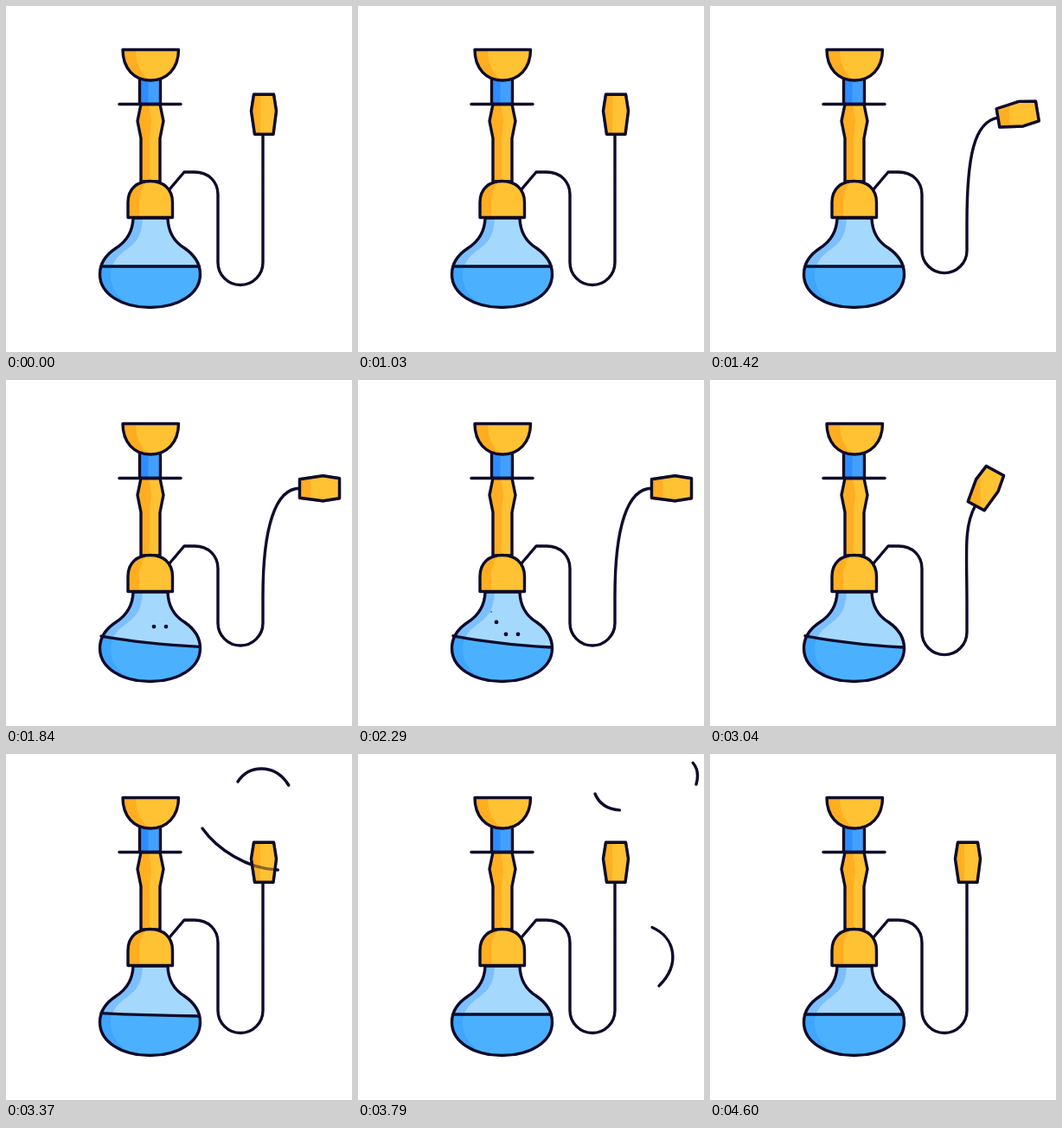
Recreate the animation shown at these times as an HTML page. Size 400 px wide and 400 px high, loop 4630 ms.

```html
<!DOCTYPE html>
<html lang="en">
<head>
<meta charset="utf-8">
<title>Hookah</title>
<style>
html, body { margin: 0; width: 100%; height: 100%; overflow: hidden; background: #fff; }
svg { display: block; width: 100vw; height: 100vh; }
.line { fill: none; stroke: #0f0b2b; stroke-width: 3.4; stroke-linecap: round; stroke-linejoin: round; }
.gold { fill: #ffc233; }
.amber { fill: #ffae22; }
</style>
</head>
<body>
<svg viewBox="0 0 400 400">
  <defs>
    <path id="bowl" d="M135 50.5H199.5C199.5 72 186 86 167 86S135 72 135 50.5Z"/>
    <path id="stem" d="M156 113.5L152 133L156 153V203H178V153L182 133L178 113.5Z"/>
    <path id="cap" d="M141 244.5V227C141 211 152 202.5 166.7 202.5S192.5 211 192.5 227V244.5Z"/>
    <path id="vase" d="M147 245C146.500 262 138 273 127 280C115 288 108.500 297 108.500 310C108.500 333 134 348.500 166.500 348.500S224.500 333 224.500 310C224.500 297 218 288 206.500 280C195 273 187.500 262 187 245Z"/>
    <path id="tip" d="M-11.500 -23H11.500L14.500 -4L11 23H-10.500L-14.500 -4Z"/>
    <clipPath id="bowlClip"><use href="#bowl"/></clipPath>
    <clipPath id="capClip"><use href="#cap"/></clipPath>
    <clipPath id="vaseClip"><use href="#vase"/></clipPath>
    <clipPath id="tipClip"><use href="#tip" class="turn"/></clipPath>
    <g id="mouthpiece">
      <g clip-path="url(#tipClip)">
        <rect class="gold" x="-40" y="-40" width="80" height="80"/>
        <rect class="amber" id="tipShade" x="-40" y="-40" width="36" height="80"/>
      </g>
      <use href="#tip" class="line turn"/>
    </g>
  </defs>

  <path id="hose" class="line"/>

  <g clip-path="url(#vaseClip)">
    <rect x="100" y="240" width="130" height="112" fill="#a5d8fd"/>
    <path id="water" fill="#4bb1ff"/>
    <path d="M158 244C157 265 152 272 140 281C127 290 121 299 121 312C121 330 137 345 157 350H100V244Z" fill="#2a8cff" opacity=".33"/>
  </g>
  <path id="level" class="line"/>
  <g id="bubbles" fill="#0f0b2b"></g>
  <use href="#vase" class="line"/>

  <rect x="154.500" y="83" width="24" height="30.500" fill="#42a0ff"/>
  <rect x="154.500" y="83" width="10" height="30.500" fill="#2f8cff"/>
  <path class="line" d="M154.500 83V113.500M178.500 83V113.500"/>

  <use href="#stem" class="gold"/>
  <path class="amber" d="M156 113.500L152 133L156 153V203H166V153L168 133L165 113.500Z"/>
  <use href="#stem" class="line"/>
  <path class="line" d="M131 113.500H202"/>

  <use href="#cap" class="gold"/>
  <path class="amber" clip-path="url(#capClip)" d="M140 246V200H168C158 205 154 215 154 228V246Z"/>
  <use href="#cap" class="line"/>

  <use href="#bowl" class="gold"/>
  <path class="amber" clip-path="url(#bowlClip)" d="M134 49H150C150 68 157 81 169 87H134Z"/>
  <use href="#bowl" class="line"/>

  <use href="#mouthpiece" class="move"/>
  <g id="smoke"></g>
  <use href="#mouthpiece" class="move" opacity=".5"/>
</svg>
<script>
const LOOP = 4630;
const $ = id => document.getElementById(id);
const all = sel => [...document.querySelectorAll(sel)];
const clamp = v => Math.max(0, Math.min(1, v));
const mix = (a, b, k) => a + (b - a) * k;
const ease = (t, start, dur) => {
  const u = clamp((t - start) / dur);
  return u * u * (3 - 2 * u);
};
const make = (tag, parent, attrs) => {
  const el = document.createElementNS("http://www.w3.org/2000/svg", tag);
  for (const k in attrs) el.setAttribute(k, attrs[k]);
  return parent.appendChild(el);
};

const movers = all(".move"), turners = all(".turn");

// head and tail: [start, duration]
const wisps = [
  { d: "M227 86C244 110 280 134 316 134C352 136 305 186 339 200C366 211 374 242 348 268",
    head: [3190, 430], tail: [3380, 650] },
  { d: "M268 32C281 12 309 12 324 32C338 54 352 50 358 30C364 6 380 2 387 10C394 18 393 28 391 35",
    head: [3190, 430], tail: [3380, 540] },
  { d: "M274 46C279 58 290 65 306 65C340 66 345 20 362 20C372 20 375 32 370 42",
    head: [3650, 430], tail: [3840, 560] }
].map(w => {
  const el = make("path", $("smoke"), { d: w.d, class: "line" });
  return { ...w, el, len: el.getTotalLength() };
});

// bubbles repeat every PERIOD while the pipe is drawn on
const PERIOD = 560, RISE = 0.08, BLOW = [1540, 2760];
const bubbles = [
  { x: 149, y: 301, born: 2532, life: 250 },
  { x: 154, y: 302, born: 1865, life: 445 },
  { x: 160, y: 303, born: 2003, life: 430 },
  { x: 171, y: 300, born: 2215, life: 300 },
  { x: 185, y: 306, born: 2140, life: 320 }
].map(b => ({ ...b, el: make("circle", $("bubbles"), { cx: b.x }) }));

function drawPipe(t) {
  const p = ease(t, 1030, 490) - ease(t, 2735, 490);
  const cx = mix(298, 362.5, p), cy = 125.3;
  const a = p * Math.PI / 2, s = Math.sin(a), c = Math.cos(a);
  movers.forEach(m => m.setAttribute("transform", `translate(${cx} ${cy})`));
  turners.forEach(m => m.setAttribute("transform", `rotate(${p * 90})`));
  $("tipShade").setAttribute("width", mix(36, 30, p));

  const ex = cx - 23 * s - c, ey = cy + 23 * c;
  const low = mix(296.5, 281, p);
  $("hose").setAttribute("d",
    `M189 212L206 192H218C234 192 245 203 245 218V${low}` +
    `A26 26 0 0 0 297 ${low}V${mix(260, 250, p)}` +
    `C297 ${mix(210, 170, p)} ${ex - 28 * s} ${ey + 28 * c} ${ex} ${ey}`);
}

function drawWater(t) {
  const k = ease(t, 1540, 360) - ease(t, 3050, 480);
  const l = 301 - 5.2 * k, r = 301 + 8 * k;
  const top = `M110 ${l}Q160 ${(l + r) / 2 + 3 * k} 223.500 ${r}`;
  $("level").setAttribute("d", top);
  $("water").setAttribute("d", top + `H230V352H100V${l}Z`);
}

function drawBubbles(t) {
  for (const b of bubbles) {
    const age = (((t - b.born) % PERIOD) + PERIOD) % PERIOD;
    const birth = t - age;
    const on = birth >= BLOW[0] && birth <= BLOW[1] && age < b.life;
    const size = on ? Math.min(1, age / 50, (b.life - age) / 60) : 0;
    b.el.setAttribute("cy", b.y - RISE * age);
    b.el.setAttribute("r", 2.4 * size);
  }
}

function drawSmoke(t) {
  for (const w of wisps) {
    const head = ease(t, ...w.head) * w.len, tail = ease(t, ...w.tail) * w.len;
    const seg = head - tail;
    w.el.style.display = seg > 0.5 ? "" : "none";
    w.el.setAttribute("stroke-dasharray", `${Math.max(seg, 0)} ${w.len * 2}`);
    w.el.setAttribute("stroke-dashoffset", -tail);
  }
}

function draw(t) {
  drawPipe(t);
  drawWater(t);
  drawBubbles(t);
  drawSmoke(t);
}

const begin = performance.now();
function tick() {
  draw((performance.now() - begin) % LOOP);
  requestAnimationFrame(tick);
}
draw(0);
requestAnimationFrame(tick);
</script>
</body>
</html>
```
